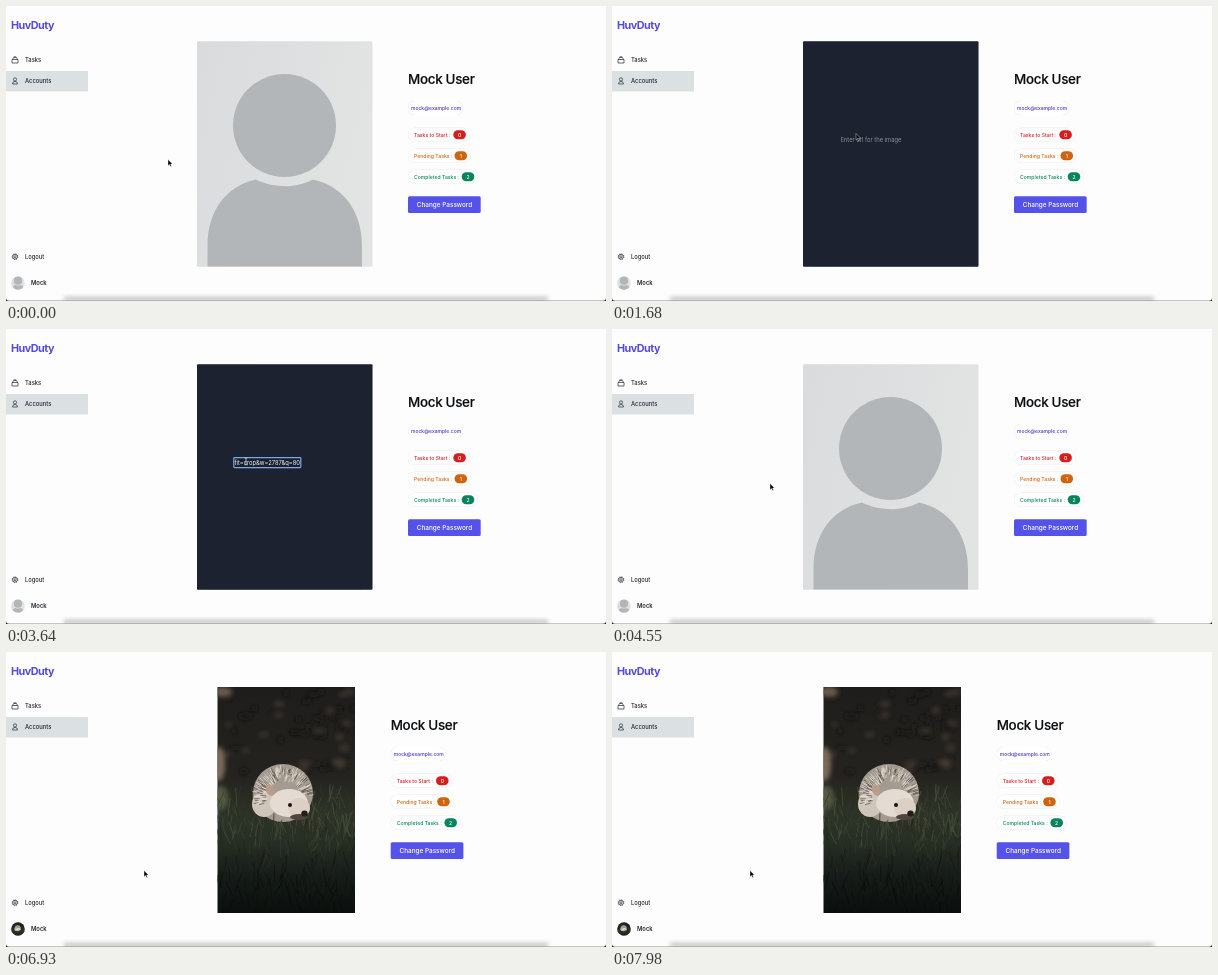
Write an HTML page that moves like this. It is 600x295 px and loops after 8 s.

```html
<!DOCTYPE html>
<html lang="en">
<head>
<meta charset="utf-8">
<title>Account page</title>
<style>
html, body { margin: 0; width: 100%; height: 100%; overflow: hidden; background: #222; }
svg { display: block; width: 600px; height: 295px; font: 500 5.8px Inter, "Open Sans", sans-serif; fill: #23272f; }
.icon { fill: none; stroke: #3b4048; stroke-width: .8; stroke-linejoin: round; }
.pill { fill: #fff; filter: drop-shadow(0 .8px .6px #0003); }
.small { font-size: 5.1px; }
</style>
</head>
<body>
<svg viewBox="0 0 600 295">
  <defs>
    <linearGradient id="paper" x2="1" y2=".3">
      <stop stop-color="#d9dbdc"/><stop offset="1" stop-color="#e2e4e4"/>
    </linearGradient>
    <linearGradient id="dusk" x2="0" y2="1">
      <stop stop-color="#1f1d1b"/><stop offset=".4" stop-color="#25231f"/>
      <stop offset=".55" stop-color="#2d3327"/><stop offset=".68" stop-color="#272f25"/>
      <stop offset=".85" stop-color="#141b18"/><stop offset="1" stop-color="#0a0f0e"/>
    </linearGradient>
    <filter id="blur" y="-100%" height="300%"><feGaussianBlur stdDeviation="2"/></filter>
    <clipPath id="frame"><rect x="211.5" y="35" width="137.5" height="226"/></clipPath>
    <clipPath id="round"><circle cx="12" cy="277" r="6.8"/></clipPath>
  </defs>

  <rect y="-5" width="600" height="299.8" rx="3" fill="#fdfdfd"/>
  <rect x="58" y="291" width="484" height="3.5" fill="#777" opacity=".5" filter="url(#blur)"/>

  <text x="5" y="23" font-size="10.8" font-weight="700" letter-spacing="-.5" fill="#544bdc">HuvDuty</text>
  <rect y="65" width="82" height="20.5" fill="#dbe0e2"/>
  <text x="19" y="56.2">Tasks</text>
  <text x="19" y="77.2">Accounts</text>
  <text x="19" y="253">Logout</text>
  <text x="25" y="279.2" font-weight="600">Mock</text>
  <g class="icon">
    <path d="M6 53.5h6v3.5h-6zM6.5 53.5l1-2h3l1 2M7.7 50.8h2.6"/>
    <circle cx="9" cy="73.4" r="1.6"/><path d="M6.5 78q0-2.6 2.5-2.6t2.5 2.6z"/>
    <circle cx="9" cy="250.7" r="2.4"/><circle cx="9" cy="250.7" r="1"/>
    <circle cx="9" cy="250.7" r="2.9" stroke-dasharray="1.14 1.14"/>
  </g>

  <g id="blank">
    <rect x="191" y="35.3" width="175.5" height="225.4" rx="1.5" fill="url(#paper)"/>
    <g fill="#b3b6b8">
      <circle cx="278.5" cy="119.5" r="51.5"/>
      <path d="M201.5 260.5V240C201.5 205 220 180 250 173.5C268 182.5 290 182.5 307 173.5C337 180 356 205 356 240V260.5Z"/>
    </g>
  </g>
  <g id="photo" clip-path="url(#frame)"></g>
  <g clip-path="url(#round)">
    <use id="blankIcon" href="#blank" transform="translate(12 277) scale(.08) translate(-278.5 -148)"/>
    <use id="photoIcon" href="#photo" transform="translate(12 277) scale(.102) translate(-280.5 -148)"/>
  </g>

  <g id="overlay">
    <rect x="191" y="35.3" width="175.5" height="225.4" rx="1" fill="#1d2230"/>
    <rect id="ring" x="227.8" y="128.6" width="67" height="10" rx=".8" fill="#1a1f2b" stroke="#75aaf0" stroke-width="1.2"/>
    <text id="entry" x="228.4" y="135.8" font-weight="400"></text>
  </g>

  <g id="details"></g>

  <g id="pointer">
    <path id="arrow" d="M0 0V6.2L1.5 4.9L2.4 7.1L3.5 6.7L2.6 4.5H4.5Z" fill="#000" stroke="#fff" stroke-width=".4"/>
    <path id="beam" d="M-1.3-3.5Q0-3.5 0-2.6Q0-3.5 1.3-3.5M0-2.6V2.6M-1.3 3.5Q0 3.5 0 2.6Q0 3.5 1.3 3.5" fill="none" stroke="#c9ccd1" stroke-width=".8"/>
  </g>
</svg>
<script>
const $ = id => document.getElementById(id);

let seed = 7;
const rand = (a, b) => {
  seed = seed * 16807 % 2147483647;
  return a + (b - a) * seed / 2147483647;
};
const repeat = (n, make) => Array.from({ length: n }, (_, i) => make(i)).join('');
const line = (x1, y1, x2, y2, color, width) =>
  `<path d="M${x1} ${y1}L${x2} ${y2}" stroke="${color}" stroke-width="${width}"/>`;
const blob = (x, y, rx, ry, color, extra = '') =>
  `<ellipse cx="${x}" cy="${y}" rx="${rx}" ry="${ry}" fill="${color}" ${extra}/>`;

// Blades fade to black towards the bottom
function grass(n, top, bottom) {
  return repeat(n, () => {
    const x = rand(208, 352), y = rand(top, bottom);
    const light = rand(13, 31) * Math.min(1, Math.max(.25, (255 - y) / 70));
    return line(x, y, x + rand(-7, 7), y - rand(7, 20), `hsl(88 16% ${light}%)`, .7);
  });
}

// Short spines that follow the dome of the back
function quills() {
  return repeat(170, i => {
    const angle = rand(-3.4, -.1), near = rand(.5, .85), far = near + rand(.12, .2);
    const c = 31 * Math.cos(angle), s = 33 * Math.sin(angle);
    return line(277 + c * near, 146 + s * near, 277 + c * far, 146 + s * far,
      i % 3 ? '#e6ded4' : '#54483f', .7);
  });
}

$('photo').innerHTML =
  '<rect x="211" y="35" width="139" height="226" fill="url(#dusk)"/>' +
  '<g filter="url(#blur)">' +
  repeat(55, i => blob(rand(212, 349), rand(38, 122), rand(2, 7), rand(2, 4),
    i % 3 ? '#141413' : '#4b4038', 'opacity=".6"')) +
  blob(217, 40, 9, 5, '#6b5a4c') +
  blob(213, 112, 6, 17, '#7a6a58') +
  blob(214, 146, 8, 12, '#545a42') + '</g>' +
  grass(170, 145, 190) +
  blob(277, 141, 30, 29, '#a39a90') +
  blob(258, 152, 12, 13, '#cfc6bb') +
  quills() +
  blob(283, 151, 19, 14, '#e4dcd2') +
  blob(293, 156, 11, 10, '#dccfc4') +
  blob(264, 138, 4, 6, '#b99c8b', 'transform="rotate(-25 264 138)"') +
  blob(284, 153, 2, 2, '#171413') +
  blob(293, 165, 9, 3, '#4f453c') +
  blob(298.5, 161.5, 3.2, 3, '#231d1c') +
  grass(260, 180, 275);

function badge(label, count, y, x, color) {
  return `<rect class="pill" x="402" y="${y - 7}" width="${x - 392}" height="14" rx="7"/>
    <text class="small" x="408" y="${y + 1.9}" fill="${color}">${label} :</text>
    <rect x="${x - 6.3}" y="${y - 4.6}" width="12.6" height="9" rx="4.5" fill="${color}"/>
    <text class="small" x="${x}" y="${y + 1.8}" fill="#fff" text-anchor="middle">${count}</text>`;
}

$('details').innerHTML =
  `<text x="402" y="77.6" font-size="13.4" letter-spacing="-.3" fill="#0b0d11" stroke="#0b0d11" stroke-width=".15">Mock User</text>
  <rect class="pill" x="402" y="95" width="55" height="14" rx="7"/>
  <text x="405" y="104" font-size="5" fill="#4338ca">mock@example.com</text>` +
  badge('Tasks to Start', 0, 128.8, 453.6, '#d41f1f') +
  badge('Pending Tasks', 1, 149.8, 454.8, '#d0640e') +
  badge('Completed Tasks', 2, 170.8, 462, '#07845d') +
  `<rect x="402" y="190.3" width="72.7" height="16.7" rx="1.5" fill="#5552e9"/>
  <text x="438.5" y="201.1" font-size="6.4" text-anchor="middle" fill="#fff">Change Password</text>`;

// Pointer path: time, x, y
const path = [
  [0, 162, 153.5], [70, 163, 154], [280, 200, 168], [560, 268, 188], [840, 285, 182],
  [910, 275, 166], [1050, 264, 152], [1400, 247, 133], [1680, 244, 127.5], [1820, 244, 127.5],
  [1890, 241, 131], [1960, 240, 132.5], [4270, 240, 132.5], [4340, 232, 137], [4480, 185, 150],
  [4550, 158, 154.5], [4970, 130, 160.5], [6090, 130, 160.5], [6790, 137, 209],
  [6930, 138, 218.5], [8000, 138, 218.5]
];

function pointerAt(t) {
  const i = path.findIndex(p => p[0] > t);
  const [t0, x0, y0] = path[i - 1], [t1, x1, y1] = path[i];
  const k = (t - t0) / (t1 - t0);
  return [x0 + (x1 - x0) * k, y0 + (y1 - y0) * k];
}

const ramp = (t, from, to) => Math.min(1, Math.max(0, (t - from) / (to - from)));
const show = (id, on) => $(id).setAttribute('visibility', on ? 'visible' : 'hidden');

function draw(time) {
  const t = Math.floor(time / 70) * 70;
  const typing = t >= 1890 && t < 4340, pasted = t >= 3080, updated = t >= 6930;
  $('pointer').setAttribute('transform', `translate(${pointerAt(t)})`);
  show('arrow', !typing);
  show('beam', typing);
  $('overlay').setAttribute('opacity', ramp(t, 210, 490) - ramp(t, 4340, 4550));
  show('ring', t >= 2170);
  $('entry').textContent = pasted ? 'fit=crop&w=2787&q=80' : 'Enter url for the image';
  $('entry').setAttribute('fill', pasted ? '#f4f5f7' : '#8c9098');
  for (const id of ['blank', 'blankIcon']) $(id).style.display = updated ? 'none' : '';
  for (const id of ['photo', 'photoIcon']) $(id).style.display = updated ? '' : 'none';
  $('details').setAttribute('transform', `translate(${updated ? -17.3 : 0})`);
}

const start = performance.now();
function tick() {
  draw((performance.now() - start) % 8000);
  requestAnimationFrame(tick);
}
tick();
</script>
</body>
</html>
```
